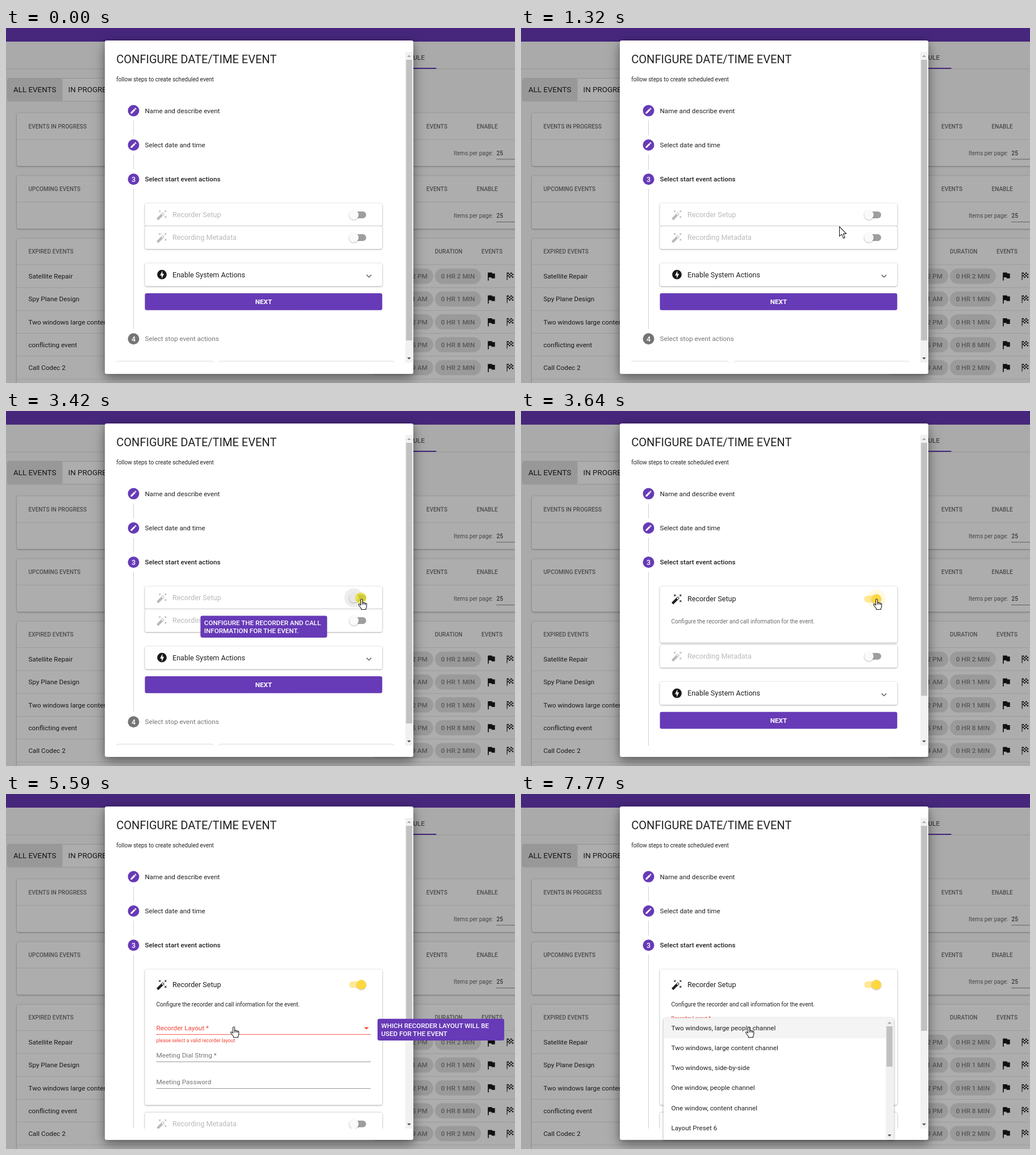
Recreate the animation shown at these times as an HTML page. Size 896 by 625 pixels, loop 8 s.

```html
<!DOCTYPE html>
<html lang="en">
<head>
<meta charset="utf-8">
<title>Configure event</title>
<style>
html, body { margin: 0; width: 100%; height: 100%; overflow: hidden; background: #aaa; }
svg { display: block; font-family: Roboto, Arial, sans-serif; }
text { white-space: pre; }
.card { fill: #fff; filter: drop-shadow(0 1.3px .8px rgba(0,0,0,.26)) drop-shadow(0 .6px 1.6px rgba(0,0,0,.16)); }
.dialog { fill: #fff; filter: drop-shadow(0 8px 12px rgba(0,0,0,.3)) drop-shadow(0 3px 6px rgba(0,0,0,.25)); }
.menu { fill: #fff; filter: drop-shadow(0 1.5px 2px rgba(0,0,0,.35)); }
.knob { filter: drop-shadow(0 1px 1px rgba(0,0,0,.28)); }
.tip { transform-box: fill-box; transform-origin: center; }
</style>
</head>
<body>
<svg id="stage" width="896" height="625" viewBox="0 0 896 625"></svg>
<script>
const PURPLE = '#673ab7', RED = '#f44336';
const SMALL = 10.05, BODY = 11.7, HEAD = 12.55, LARGE = 13.4;

const ICON = {
  edit: 'M3 17.25V21h3.75L17.81 9.94l-3.75-3.75L3 17.25zM20.71 7.04c.39-.39.39-1.02 0-1.41l-2.34-2.34c-.39-.39-1.02-.39-1.41 0l-1.83 1.83 3.75 3.75 1.83-1.83z',
  flag: 'M14.4 6L14 4H5v17h2v-7h5.6l.4 2h7V6z',
  bolt: 'M12 2a10 10 0 1 0 0 20a10 10 0 1 0 0-20zM11.48 20v-6.26H8L13 4v6.26h3.35L11.48 20z',
  wand: 'M7.5 5.6L5 7 6.4 4.5 5 2 7.5 3.4 10 2 8.6 4.5 10 7zM19.5 15.4L22 14 20.6 16.5 22 19 19.5 17.6 17 19 18.4 16.5 17 14zM22 2L20.6 4.5 22 7 19.5 5.6 17 7 18.4 4.5 17 2 19.5 3.4zM13.34 12.78L15.78 10.34 13.66 8.22 11.22 10.66zM14.37 7.29L16.71 9.63Q17.4 10.3 16.71 11.04L5.04 22.71Q4.3 23.4 3.63 22.71L1.29 20.37Q.6 19.7 1.29 18.96L12.96 7.29Q13.7 6.6 14.37 7.29z'
};

// Text is placed by the vertical centre of its capitals.
const text = (x, y, s, size = BODY, attrs = 'opacity=".87"') =>
  `<text x="${x}" y="${y + size * .355}" font-size="${size}" ${attrs}>${s}</text>`;
const rect = (x, y, x2, y2, fill, r = 0, attrs = '') =>
  `<rect x="${x}" y="${y}" width="${x2 - x}" height="${y2 - y}" rx="${r}" fill="${fill}" ${attrs}/>`;
const card = (x, y, x2, y2, cls = 'card', attrs = '') => rect(x, y, x2, y2, '#fff', 3.3, `class="${cls}" ${attrs}`);
const hline = (x, x2, y, alpha = .12, color = '#000') => rect(x, y - .45, x2, y + .45, color, 0, `opacity="${alpha}"`);
const icon = (name, x, y, scale = .837, attrs = '') =>
  `<path d="${ICON[name]}" fill-rule="evenodd" transform="translate(${x} ${y}) scale(${scale}) translate(-12 -12)" ${attrs}/>`;
const arrow = (x, y, dir, fill, w = 3.4) => `<path d="M${x - w} ${y - dir * w / 2}h${2 * w}l${-w} ${dir * w}z" fill="${fill}"/>`;
const MUTED = 'font-weight="500" opacity=".56"';

function tableHead(y, title, cols) {
  return text(39.5, y, title, SMALL, MUTED) + cols.map(([x, s]) => text(x, y, s, SMALL, MUTED)).join('');
}

function emptyTable(y, title) {
  return card(19, y, 930, y + 93) + hline(19, 930, y + 46) +
    tableHead(y + 23, title, [[740, 'EVENTS'], [828.5, 'ENABLE']]) +
    text(788, y + 70, 'Items per page:', SMALL, 'opacity=".6"') +
    text(863.5, y + 70, '25', SMALL) + hline(863, 930, y + 81, .5);
}

function row([name, time, mins], i) {
  const y = 437 + i * 40.2, chip = 'font-weight="500" opacity=".43"';
  let checks = rect(881.5, y - 6.5, 882.7, y + 7, '#000');
  for (let k = 0; k < 16; k++) {
    const a = k % 4, b = k >> 2;
    if ((a + b) % 2 == 0) checks += rect(882.5 + a * 2.7, y - 6.5 + b * 2.3, 885.2 + a * 2.7, y - 4.2 + b * 2.3, '#000');
  }
  return text(39.5, y, name) + hline(19, 930, y + 20.1) +
    rect(640, y - 13.4, 752, y + 13.4, '#e2e2e2', 13.4) +
    text(742, y, time, BODY, chip + ' text-anchor="end"') +
    rect(755, y - 13.4, 836, y + 13.4, '#e2e2e2', 13.4) +
    text(795.5, y, `0 HR ${mins} MIN`, BODY, chip + ' text-anchor="middle"') +
    icon('flag', 854, y + .3, .837, 'opacity=".9"') + `<g opacity=".85">${checks}</g>`;
}

function step(y, label, mark, color = PURPLE, attrs) {
  return `<circle cx="224.5" cy="${y}" r="10" fill="${color}"/>` +
    (mark ? text(224.5, y, mark, 12.6, 'fill="#fff" font-weight="500" text-anchor="middle"') : icon('edit', 224.5, y, .56, 'fill="#fff"')) +
    text(244.5, y, label, BODY, attrs);
}

const toggle = (y, id) => rect(604, y - 5.9, 634, y + 5.9, '#9e9e9e', 5.9, `id="${id}Bar"`) +
  `<circle id="${id}Knob" class="knob" cx="612.4" cy="${y}" r="8.4" fill="#fafafa"/>`;

const field = (y, label) => text(264.5, y, label, BODY, 'opacity=".54"') + hline(264.5, 642, y + 12, .45);

const scrollbar = (x, y, y2, thumb) => rect(x, y, x + 13.5, y2, '#f1f1f1') + thumb +
  arrow(x + 6.7, y + 7.2, -1, '#a3a3a3') + arrow(x + 6.7, y2 - 7.2, 1, '#505050');

function tip(id, x, y, lines) {
  return `<g id="${id}" class="tip">` + rect(x, y, x + 223, y + 38.3, PURPLE, 3.3) +
    lines.map((s, i) => text(x + 6.5, y + 11.8 + i * 14.4, s, 11.62, 'fill="#fff" font-weight="500"')).join('') + '</g>';
}

const page = rect(0, 0, 896, 625, '#fafafa') + rect(0, 0, 896, 24, PURPLE) +
  hline(0, 896, 72) + text(737, 52, 'SCHEDULE', BODY, 'font-weight="500" opacity=".6" text-anchor="end"') +
  rect(640, 70, 757.5, 72, PURPLE) +
  rect(2.5, 88.5, 300, 129, '#fff', 3.3, 'stroke="#000" stroke-opacity=".14"') +
  rect(3, 89, 99.5, 128.5, '#e0e0e0', 3) +
  text(13, 108.5, 'ALL EVENTS', LARGE) + text(109.5, 108.5, 'IN PROGRESS', LARGE) +
  emptyTable(150, 'EVENTS IN PROGRESS') + emptyTable(260.5, 'UPCOMING EVENTS') +
  card(19, 371, 930, 660) + hline(19, 930, 416.7) +
  tableHead(393.5, 'EXPIRED EVENTS', [[755, 'DURATION'], [837, 'EVENTS']]) +
  [['Satellite Repair', '12:12 PM', 2], ['Spy Plane Design', '10:11 AM', 1], ['Two windows large content', '12:12 PM', 1],
   ['conflicting event', '12:15 PM', 8], ['Call Codec 2', '10:09 AM', 2]].map(row).join('') +
  rect(0, 0, 896, 625, '#000', 0, 'opacity=".32"');

const form = `<g id="form" clip-path="url(#fold)">` +
  text(264.5, 370.5, 'Configure the recorder and call information for the event.', SMALL) +
  `<text id="label" x="264.5" fill="${RED}">Recorder Layout *</text>` +
  arrow(634.5, 412.5, 1, RED, 4.2) + hline(264.5, 642, 423.3, 1, RED) +
  text(264.5, 433.7, 'please select a valid recorder layout', 8.76, `fill="${RED}"`) +
  field(459.5, 'Meeting Dial String *') + field(506.5, 'Meeting Password') + '</g>';

// Everything that is pushed down when the first panel opens.
const lower = `<g id="lower">` + card(244.5, 348.8, 662.3, 389) + hline(244.5, 662.3, 348.6, .07) +
  `<g opacity=".27">${icon('wand', 274.5, 369)}${text(293, 369, 'Recording Metadata', HEAD, '')}</g>` + toggle(369, 'meta') +
  card(244.5, 414.2, 662.3, 454.5) + rect(244.5, 414.2, 662.3, 454.5, '#000', 3.3, 'id="hover" opacity=".045"') +
  icon('bolt', 274.5, 434.2, .837, 'opacity=".9"') + text(293, 434.2, 'Enable System Actions', HEAD) +
  '<path d="M634.8 434.6l4.1 4.1 4.1-4.1" fill="none" stroke="#666" stroke-width="1.6"/>' +
  rect(244.5, 467, 662.3, 496.8, PURPLE, 3.3) +
  text(453.4, 481.7, 'NEXT', BODY, 'fill="#fff" font-weight="700" text-anchor="middle"') +
  step(547.2, 'Select stop event actions', '4', '#757575', 'opacity=".54"') +
  [[194.5, 365], [375, 683]].map(([a, b]) => rect(a, 586.5, b, 620, 'none', 3.3, 'stroke="#000" stroke-opacity=".14"')).join('') + '</g>';

const dialog = card(174, 22, 717, 609, 'dialog') + '<g clip-path="url(#view)">' +
  text(194.3, 55, 'CONFIGURE DATE/TIME EVENT', 20.05) +
  text(194.3, 90, 'follow steps to create scheduled event', SMALL) +
  [163, 223].map(y => rect(224, y, 224.9, y + 26, '#bdbdbd', 0, 'opacity=".8"')).join('') +
  rect(224, 283, 224.9, 530, '#bdbdbd', 0, 'id="stem" opacity=".8"') +
  step(145.6, 'Name and describe event') + step(206, 'Select date and time') +
  step(266.2, 'Select start event actions', '3', PURPLE, 'font-weight="500" opacity=".87"') +
  card(244.5, 308.9, 662.3, 348.8, 'card', 'id="panel"') + form +
  `<g id="header"><g id="title">${icon('wand', 274.5, 329)}${text(293, 329, 'Recorder Setup', HEAD, '')}</g>` +
  toggle(329, 'rec') + '<circle id="ripple" cy="329" r="16.7"/></g>' + lower +
  scrollbar(702.8, 42, 589, rect(704.3, 56, 715, 550, '#c1c1c1', 0, 'id="thumb"')) + '</g>';

const options = ['Two windows, large people channel', 'Two windows, large content channel', 'Two windows, side-by-side',
  'One window, people channel', 'One window, content channel', 'Layout Preset 6'];
const menu = `<g id="menu">` + card(251, 394.6, 656, 609, 'menu') + rect(251, 394.8, 642, 430, '#f4f4f4') +
  options.map((s, i) => text(264.5, 411.8 + i * 35.15, s)).join('') +
  scrollbar(642, 395.5, 608.5, rect(643.3, 409, 654, 480, '#c1c1c1')) + '</g>';

const cursor = `<circle id="click" r="10" fill="#e9dc1c" opacity=".72"/><g id="cursor" fill="#fff" stroke="#1c1c24" stroke-width="1.1" stroke-linejoin="round">
<path id="pointer" d="M0 0V17L4 13.5 7 20.5 9.6 19.4 6.7 12.5H12Z"/>
<path id="hand" d="M-1.5 11V1.5a1.5 1.5 0 0 1 3 0V6.5q1.5-1 2.6.5 1.6-.8 2.6.7 2-.5 2.1 1.3V13q0 2-1.3 3.5V18.5H-.5V17L-4.6 11.5q-1.6-2.4.2-2.7 1 0 2.9 2.2zM1.5 6.5V10M4.1 7V10M6.7 7.7V10.5"/></g>`;

document.getElementById('stage').innerHTML =
  `<defs><clipPath id="view">${rect(174, 22, 717, 589, '#000')}</clipPath>` +
  `<clipPath id="fold">${rect(244, 309, 663, 348, '#000', 0, 'id="foldBox"')}</clipPath></defs>` +
  page + dialog + menu +
  tip('tip1', 342.3, 360.6, ['CONFIGURE THE RECORDER AND CALL', 'INFORMATION FOR THE EVENT.']) +
  tip('tip2', 654, 395.8, ['WHICH RECORDER LAYOUT WILL BE', 'USED FOR THE EVENT']) + cursor;

const $ = id => document.getElementById(id);
const set = (id, attrs) => { for (const k in attrs) $(id).setAttribute(k, attrs[k]); };
const ramp = (t, a, b) => Math.min(1, Math.max(0, (t - a) / (b - a)));
const ease = (t, a, b) => { const x = ramp(t, a, b); return x * x * (3 - 2 * x); };
const inside = (v, a, b) => v >= a && v < b;

// time, x, y of the cursor's tip
const PATH = [[230, 853, 612], [550, 752, 508], [900, 653, 416], [980, 653, 416], [1000, 640, 405], [1400, 541, 336],
  [1600, 533.5, 331], [2500, 533.5, 331], [2700, 562, 332], [2950, 615, 332], [3080, 626, 331], [4120, 626, 331],
  [4330, 598, 340], [4970, 452, 361], [5200, 413, 397], [5480, 401, 410]];

function cursorAt(t) {
  const i = PATH.findIndex(k => k[0] > t);
  if (i < 1) return PATH.at(i).slice(1);
  const [a, b] = [PATH[i - 1], PATH[i]], u = (t - a[0]) / (b[0] - a[0]);
  return [a[1] + (b[1] - a[1]) * u, a[2] + (b[2] - a[2]) * u];
}

function showTip(id, amount) {
  $(id).style.opacity = amount;
  $(id).style.transform = `scale(${.7 + .3 * amount})`;
}

function draw(t) {
  const open = ease(t, 3540, 3820), on = ease(t, 3480, 3580), shift = 211.8 * open;
  set('panel', { height: 39.9 + 198.7 * open });
  set('foldBox', { height: 39 + 198.7 * open });
  set('form', { opacity: ramp(t, 3560, 3680) });
  set('header', { transform: `translate(0 ${6.7 * open})` });
  set('title', { opacity: .27 + .6 * on });
  set('lower', { transform: `translate(0 ${shift})` });
  set('stem', { height: 247 + shift });
  set('thumb', { height: 519 * 547 / (574.6 + shift) });
  set('recKnob', { cx: 612.4 + 13.2 * on, fill: on > .5 ? '#ffd740' : '#fafafa' });
  set('recBar', { fill: on > .5 ? '#ffe998' : '#9e9e9e' });
  set('ripple', { cx: 612.4 + 13.2 * on, fill: on > .5 ? '#ffd740' : '#000',
    opacity: t < 3410 ? 0 : (on > .5 ? .16 : .07) * (1 - ramp(t, 3640, 3930)) });

  const float = ease(t, 7380, 7760), size = BODY - 2.93 * float;
  set('label', { 'font-size': size, y: 411.8 - 17 * float + size * .355 });
  const drop = ease(t, 7370, 7540);
  set('menu', { opacity: drop, transform: `translate(0 ${394.6 * .2 * (1 - drop)}) scale(1 ${.8 + .2 * drop})` });

  showTip('tip1', ease(t, 1380, 1560) * (1 - ramp(t, 3440, 3560)));
  showTip('tip2', ease(t, 5360, 5560) * (1 - ramp(t, 7370, 7480)));

  const [x, y] = cursorAt(t);
  const onSystem = open < .5 && inside(x, 244, 662) && inside(y, 414, 455);
  const hand = onSystem || (open < .5 ? inside(x, 604, 634) && inside(y, 320, 338) : y < 362 || y > 397);
  set('hover', { visibility: onSystem ? 'visible' : 'hidden' });
  set('cursor', { transform: `translate(${x} ${y})`, visibility: t < 230 ? 'hidden' : 'visible' });
  set('hand', { display: hand ? 'inline' : 'none' });
  set('pointer', { display: hand ? 'none' : 'inline' });
  set('click', { cx: x - 1.5, cy: y - 1.5, visibility: inside(t, 3415, 3560) || inside(t, 7215, 7390) ? 'visible' : 'hidden' });
}

function frame() {
  draw(performance.now() % 8000);
  requestAnimationFrame(frame);
}
frame();
</script>
</body>
</html>
```
